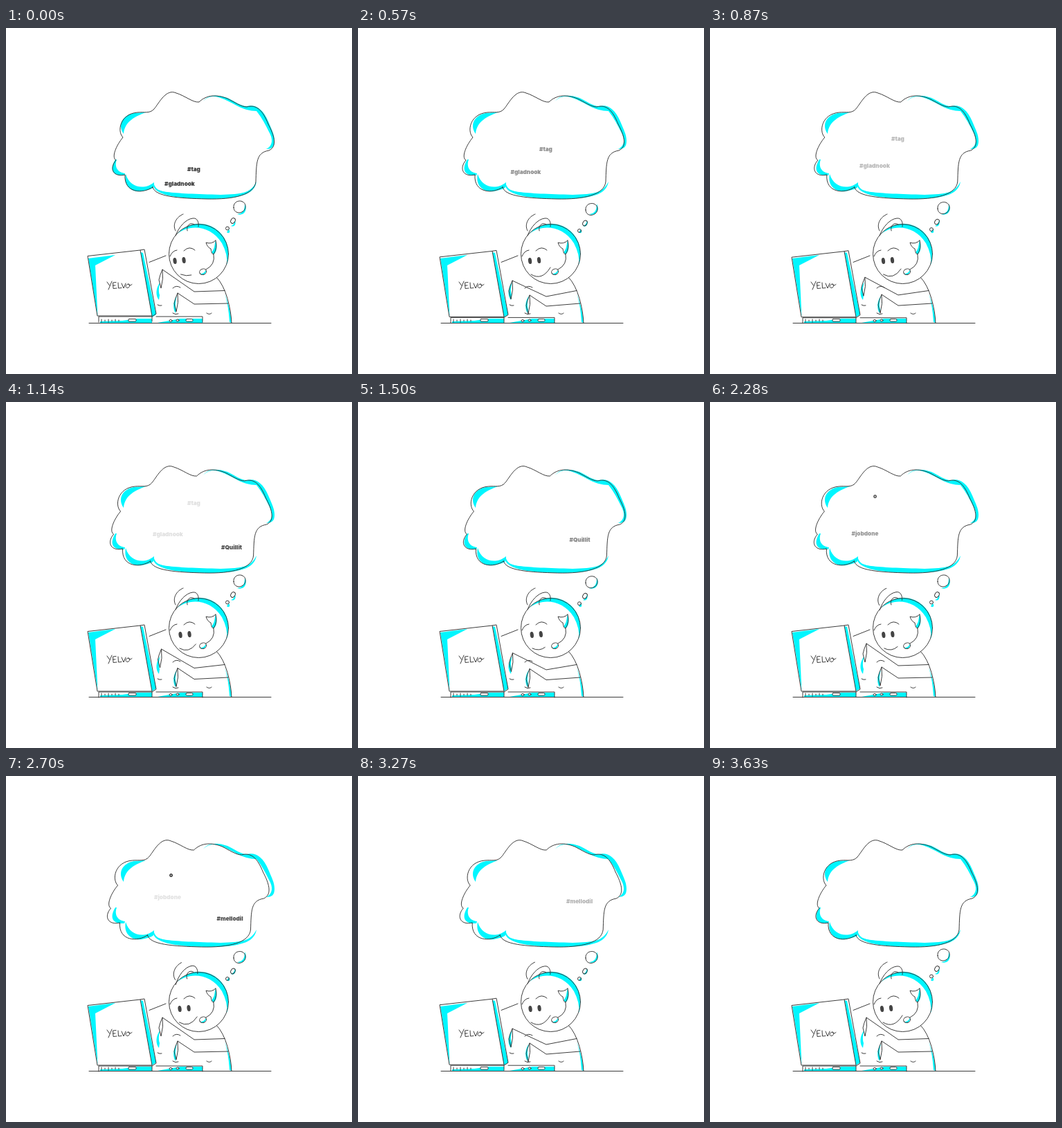
Recreate the animation shown at these times as an HTML page. Size 500 by 500 pixels, loop 3.66 s.

```html
<!DOCTYPE html>
<html lang="en">
<head>
<meta charset="utf-8">
<title>Thinking in tags</title>
<style>
  html, body { margin: 0; width: 100%; height: 100%; overflow: hidden; background: #fff; }
  svg { display: block; width: 100%; height: 100%; }
  .ink { fill: none; stroke: #333; stroke-width: .95; stroke-linecap: round; stroke-linejoin: round; }
  .tint { fill: #00f6ff; }
  .paper { fill: #fff; }
  text { font: 900 8.2px Inter, "Open Sans", sans-serif; fill: #222; }
</style>
</head>
<body>
<svg viewBox="0 0 500 500">
  <!-- thought cloud -->
  <g class="tint">
    <path d="M284 107C290 97 304 95 320 101C331 106 339 113 348 113C360 110 371 116 379 135C384 147 388 154 388 163C388 172 384 175 376 175C386 170 386 160 380 150C375 140 370 130 362 120C352 120 343 117 335 113C322 106 308 98 298 99C291 100 287 103 284 107Z"/>
    <path d="M170 153C161 140 168 126 185 123L202 122C188 127 171 135 170 153Z"/>
    <path d="M158 190C150 203 152 214 171 213L172 210C162 209 156 201 160 190Z"/>
    <path d="M173 211C169 230 184 238 196 236C206 234 212 232 213 230L214 223C201 234 179 232 173 211Z"/>
    <path d="M213 223C209 240 240 247 300 247C345 246 359 238 362 222C353 239 342 240 310 241C275 240 248 239 233 237C221 235 216 234 213 223Z"/>
  </g>
  <path id="cloud" class="ink" d="M212 230C198 240 170 239 172 212C156 216 148 204 159 191C152 187 159 170 169 158C160 149 165 124 190 122C200 121 208 124 214 117C221 109 231 87 246 94C259 98 270 108 279 107C290 96 305 96 320 102C330 107 340 114 348 114C362 110 371 119 379 139C387 154 393 171 380 177C361 180 362 195 361 222C359 241 330 248 290 247C250 246 215 244 212 230Z"/>
  <g class="tint">
    <path d="M345 254C350 264 343 272 334 269C342 268 345 264 345 254Z"/>
    <path d="M331 278C333 285 329 288 325 286C329 285 330 282 331 278Z"/>
    <path d="M322 291C325 295 322 298 319 295Z"/>
  </g>
  <g id="bubbles" class="ink">
    <path d="M329 263C328 256 335 252 341 254C348 257 347 265 343 268C337 273 329 270 329 263Z"/>
    <ellipse cx="328" cy="282" rx="3" ry="4" transform="rotate(30 328 282)"/>
    <circle cx="320" cy="293" r="2.5"/>
  </g>
  <g id="tags"></g>

  <!-- body -->
  <path class="tint" d="M316 384C320 394 325 410 326 426L323 425C322 409 320 396 316 384Z"/>
  <path class="ink" d="M304 360C318 374 325 405 326 426M207 338.500L231 329"/>
  <g class="tint">
    <path d="M223 367C216 376 216 387 221 393L222 386C220 380 221 373 223 367Z"/>
    <path d="M247 387C241 395 241 406 245 412L246 407C244 400 245 394 247 387Z"/>
  </g>
  <path id="armA" class="ink"/>
  <path id="armB" class="ink"/>
  <path class="ink" d="M219 400Q222 402 225 401M241 412Q245 415 249 413M290 412Q294 415 297 412M241 376Q246 371 252 375"/>

  <!-- head -->
  <circle class="paper" cx="278.500" cy="326.500" r="43"/>
  <path class="tint" d="M247 298A42 42 0 0 1 321 330Q321 338 319 342Q321 328 312 311C295 283 262 284 247 298Z"/>
  <circle class="ink" cx="278.500" cy="326.500" r="43"/>
  <path id="ear" class="ink" d="M245 300C250 287 260 276 270 275C277 274 279 282 278 287M245 293C240 284 246 273 256 269M262 293C260 285 267 280 272 284"/>
  <path class="ink" d="M237 330Q240 322 247 321M257 322Q265 314 273 321"/>
  <g id="eyes" fill="#444">
    <ellipse cx="0" cy="336.500" rx="2.600" ry="4.600" transform="rotate(-7 0 336)"/>
    <ellipse cx="13" cy="335.500" rx="2.600" ry="4.600" transform="rotate(-7 13 335)"/>
  </g>
  <path id="mouth" class="ink"/>
  <path class="tint" d="M303 307C306 316 304 325 300 327L297 324C302 319 301 313 303 307Z"/>
  <path class="ink" d="M303 307Q297 313 289 310Q291 317 296 319Q297 327 300 327Q306 318 303 307M300 327Q303 342 289 349"/>
  <ellipse class="paper" cx="284.500" cy="352.500" rx="5" ry="4.300"/>
  <path class="tint" d="M289 350C290 355 284 358 281 355C285 355 287 353 289 350Z"/>
  <ellipse class="ink" cx="284.500" cy="352.500" rx="5" ry="4.200" transform="rotate(-20 284 352)"/>

  <!-- laptop -->
  <g class="tint">
    <path d="M119 333L158 328L129 343L132.500 417Z"/>
    <path d="M194.500 324L198 325L213 396L217 414L211 418Z"/>
    <path d="M136 426V424L168 423L190 420H211V426Z"/>
    <path d="M219 426L252 420H284V426Z"/>
  </g>
  <g id="laptop" class="ink">
    <path d="M194 323L118 331.500L132 418H211L194 323L200 322L217 415L211 419"/>
    <path d="M134 427V419H211V426M217 419H284V427"/>
  </g>
  <g class="ink" stroke-width=".7">
    <path d="M138 421V425M143 422V424M148 421V425M153 422V424M158 421V424M163 422V424"/>
    <rect class="paper" x="177" y="420.500" width="11" height="3.500" rx="1"/>
    <rect class="paper" x="260" y="420.500" width="10" height="3.500" rx="1.500"/>
    <ellipse class="paper" cx="238" cy="423" rx="2" ry="1.500"/>
    <ellipse class="paper" cx="248" cy="422.500" rx="2" ry="1.500"/>
  </g>
  <!-- handwritten "Yelvo" -->
  <path class="ink" d="M146 367L149.500 372M153 366L148 378M159 367.500L154.500 368L155 376.500L160 376M154.500 372H158M162 368L162.500 376L167 375.500M167 369L170 376L173 369M177 370C172 370 172 376 176 375.500C180 374 179 370 177 370Q178 374 182 370.500"/>
  <path class="ink" d="M120 426.500H383"/>
</svg>
<script>
const LOOP = 3660, STEP = 30;
const TIMES = [0, 570, 1140, 1860, 2700, 3270, 3630, LOOP];
const $ = id => document.getElementById(id);
const lerp = (a, b, u) => a + (b - a) * u;
const clamp = (v, lo, hi) => Math.max(lo, Math.min(hi, v));
const smooth = u => u * u * (3 - 2 * u);

function track(values, t, ease = smooth) {
  let i = 0;
  while (i < TIMES.length - 2 && t >= TIMES[i + 1]) i++;
  const u = (t - TIMES[i]) / (TIMES[i + 1] - TIMES[i]);
  return lerp(values[i], values[i + 1], ease(u));
}

// 0 at whole cycles, 1 at half cycles
const swing = cycles => (1 - Math.cos(cycles * 2 * Math.PI)) / 2;
const linear = u => u;

const sway = [0, -3, -3.4, .2, -7.5, -6.8, -1, 0];
const gaze = [244, 248.5, 252, 250.5, 251, 249, 248.5, 244];
const smile = [.15, 1, .7, 0, .85, 1, 1, .15];
const lift = [-2, -.6, 0, 0, 0, -.8, 0, -2];
const earTurn = [0, 0, 0, 0, -5, -1, 0, 0];
const typing = [0, 2.5, 4.75, 8, 12, 14.5, 16, 16];
const bob = [0, .5, 1, 1.5, 2.5, 3.5, 4, 4];

// text, shown from / until, then two poses: [time, x, y, opacity]
const tags = [
  ['#tag', 0, 1400, [0, 262, 207, .9], [1140, 262, 149, .14]],
  ['#gladnook', 0, 1400, [0, 229, 227.5, .9], [1140, 212, 194, .14]],
  ['#Quillit', 950, 2300, [1140, 311, 212.5, .82], [1860, 300, 191.500, .28]],
  ['#jobdone', 1620, 2850, [1860, 195, 208, .82], [2700, 214, 178, .13]],
  ['#mellodil', 2480, 3630, [2700, 304.500, 209, .82], [3270, 301, 184, .34]],
  ['o', 1500, 2900, [1860, 236, 132.500, .65], [2700, 236, 146, .95]]
].map(([label, from, to, a, b]) => {
  const el = document.createElementNS('http://www.w3.org/2000/svg', 'text');
  el.textContent = label;
  $('tags').append(el);
  return { el, from, to, a, b };
});

function drawTag({ el, from, to, a, b }, t) {
  const u = (t - a[0]) / (b[0] - a[0]);
  const fadeIn = from ? clamp((t - from) / 120, 0, 1) : 1;
  const shown = t >= from && t < to;
  el.setAttribute('x', lerp(a[1], b[1], u));
  el.setAttribute('y', lerp(a[2], b[2], u));
  el.setAttribute('opacity', shown ? fadeIn * clamp(lerp(a[3], b[3], u), 0, .95) : 0);
}

const hand = (x, y) =>
  `M${x} ${y}Q${x - 4} ${y + 9} ${x - 5} ${y + 15}L${x - 2} ${y + 27}Q${x + 2} ${y + 13} ${x} ${y}`;

function draw(t) {
  const move = (id, x, y) => $(id).setAttribute('transform', `translate(${x} ${y})`);
  move('cloud', track(sway, t), 0);
  move('eyes', track(gaze, t), 0);
  move('laptop', 0, track(lift, t));
  move('bubbles', 0, -3.5 * (1 - swing(track(bob, t, linear))));
  $('ear').setAttribute('transform', `rotate(${track(earTurn, t)} 262 298)`);

  const down = swing(track(typing, t, linear));
  const yA = lerp(349, 365, down), yB = lerp(383, 386, down);
  $('armA').setAttribute('d', `${hand(lerp(226, 223, down), yA)}L272 ${lerp(381, 388, down)}L316 379.5`);
  $('armB').setAttribute('d', `${hand(248, yB)}L272 ${lerp(399, 402, down)}L321 398`);

  const m = track(smile, t);
  const pt = (x0, y0, x1, y1) => `${lerp(x0, x1, m)} ${lerp(y0, y1, m)}`;
  $('mouth').setAttribute('d',
    `M${pt(253, 356, 250, 356)}Q${pt(260, 358, 266, 366)} ${pt(266, 359, 278, 346)}`);

  tags.forEach(tag => drawTag(tag, t));
}

const start = performance.now();
function tick() {
  const t = (performance.now() - start) % LOOP;
  draw(Math.floor(t / STEP) * STEP);
  requestAnimationFrame(tick);
}
tick();
</script>
</body>
</html>
```
